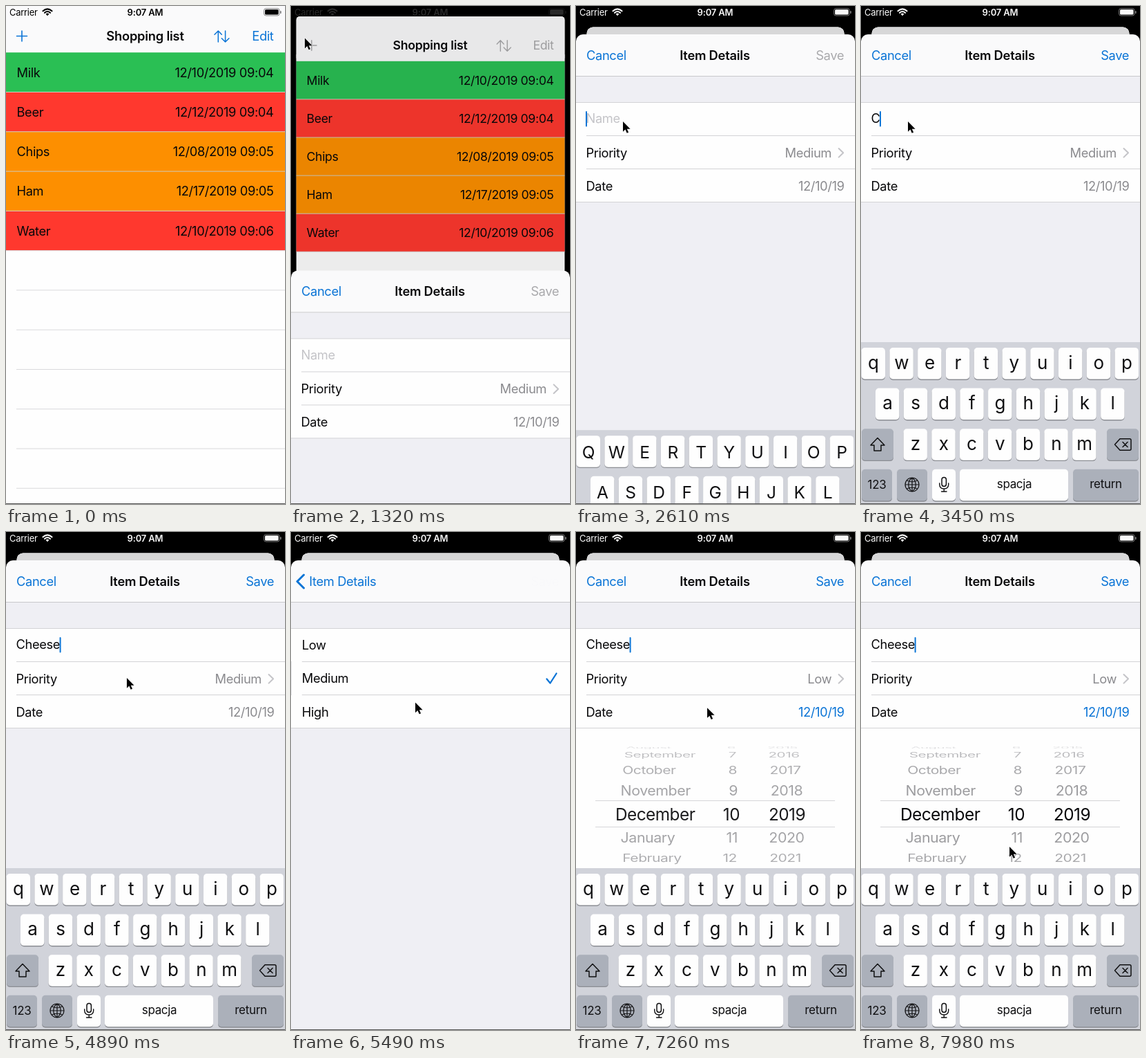
Write an HTML page that moves like this. It is 404 px wide and 720 px high and loops after 8000 ms.

```html
<!DOCTYPE html>
<html lang="en">
<head>
<meta charset="utf-8">
<title>Shopping list</title>
<style>
html, body { margin: 0; width: 100%; height: 100%; overflow: hidden; background: #000; }
svg { display: block; width: 100vw; height: 100vh; }
text { font-family: Inter, "Liberation Sans", sans-serif; letter-spacing: -.02em; white-space: pre; }
text[font-weight="600"] { letter-spacing: -.012em; }
</style>
</head>
<body>
<svg id="stage" viewBox="0 0 404 720"></svg>
<script>
const LOOP = 8000;
const SHEET = 1241.5, KEYS = 2537.5, PUSH = 5090, POP = 6225, PICK = 7060;
const TYPED = [3390, 3540, 3660, 3780, 3930, 4050];
const BLUE = '#0a74d6', INK = '#08080a', GREY = '#8a8a8e', FAINT = '#c4c4c8';
const PAPER = '#fefefe', BAR = '#fafafb', GROUP = '#efeff4', LINE = '#d3d3d6', PRESSED = '#d9d9dd';
const GREEN = '#2abf54', RED = '#ff382e', ORANGE = '#fd8f00';
const ITEMS = [
  ['Milk', '12/10/2019 09:04', GREEN], ['Beer', '12/12/2019 09:04', RED],
  ['Chips', '12/08/2019 09:05', ORANGE], ['Ham', '12/17/2019 09:05', ORANGE],
  ['Water', '12/10/2019 09:06', RED]
];
const MONTHS = ['August', 'September', 'October', 'November', 'December', 'January', 'February', 'March', 'April'];
// pointer stops: time, x, y
const PATH = [
  [450, 130, 725], [1150, 20, 46.5], [1700, 20, 46.5], [2400, 68, 167], [4250, 68, 167],
  [4900, 175, 211], [5150, 175, 211], [5490, 180, 246.5], [5600, 181, 246], [6060, 184, 158],
  [6260, 184, 158], [6600, 187, 245], [7000, 190, 254], [7250, 190, 254], [7950, 215, 455]
];

const stage = document.getElementById('stage');
const pen = document.createElement('canvas').getContext('2d');
const clamp = v => Math.max(0, Math.min(1, v));

// critically damped spring from 0 to 1
const spring = (t, start) => {
  const x = Math.max(0, t - start) * .021;
  return 1 - (1 + x) * Math.exp(-x);
};

const rect = (x, y, w, h, fill, r = 0, extra = '') =>
  `<rect x="${x}" y="${y}" width="${w}" height="${h}" rx="${r}" fill="${fill}" ${extra}/>`;
const text = (x, y, s, fill = INK, anchor = 'start', size = 18.3, weight = 400) =>
  `<text x="${x}" y="${y}" fill="${fill}" text-anchor="${anchor}" font-size="${size}" font-weight="${weight}">${s}</text>`;
const line = (d, stroke, w = 1.5, fill = 'none') =>
  `<path d="${d}" stroke="${stroke}" stroke-width="${w}" fill="${fill}" stroke-linecap="round" stroke-linejoin="round"/>`;
const group = (x, y, body) => `<g transform="translate(${x} ${y})">${body}</g>`;
const fade = (o, body) => `<g opacity="${o}">${body}</g>`;

function statusBar(p) {
  const g = Math.round(250 * clamp((p - .4) / .6)), c = `rgb(${g},${g},${g})`;
  return text(5, 13.5, 'Carrier', c, 'start', 13) +
    line('M53.5 7.2Q60 1.5 66.5 7.2M56 9.8Q60 6.2 64 9.8', c, 2.1) +
    `<path d="M57.6 11.6Q60 9.6 62.4 11.6L60 14.2Z" fill="${c}"/>` +
    text(201.5, 13.5, '9:07 AM', c, 'middle', 13, 600) +
    rect(373.5, 3.5, 22.5, 10.5, 'none', 3, `stroke="${c}" stroke-opacity=".45"`) +
    rect(375, 5, 19.5, 7.5, c, 1.6) + rect(397, 7, 1.6, 4, c, .8, 'opacity=".5"');
}

function list(p) {
  const tint = p > .1 ? '#a9a9ab' : BLUE, pitch = 57.28;
  let s = rect(0, 0, 404, 780, PAPER, 10 * p) + rect(0, 0, 404, 67, BAR, 10 * p) + rect(0, 57, 404, 10, BAR);
  ITEMS.forEach(([name, date, fill], i) => {
    const y = 67.2 + i * pitch;
    s += rect(0, y, 404, pitch, fill) + text(15.5, y + 35.3, name) + text(387.5, y + 35.3, date, INK, 'end');
  });
  for (let i = 1; i < 12; i++)
    s += rect(i < 6 ? 0 : 15, 66.7 + i * pitch, 404, 1, i < 5 ? '#cfcbbd' : '#d9d9dc');
  s += line('M15.5 43.5H30.5M23 36V51', tint, 1.6) +
    line('M307.3 52V36M302 41.3L307.3 36L312.3 41.3M317.6 36V52M312.3 46.7L317.6 52L322.9 46.7', tint) +
    text(201.5, 50, 'Shopping list', INK, 'middle', 18.3, 600) + text(387.5, 50, 'Edit', tint, 'end') +
    rect(0, 0, 404, 780, '#000', 10 * p, `opacity="${.14 * p}"`);
  return `<g transform="translate(${15.5 * p} ${30.5 * p}) scale(${1 - 31 * p / 404})">${s}</g>`;
}

function picker(open) {
  let s = '';
  for (let i = -4; i <= 4; i++) {
    const k = Math.abs(i), a = i * 20.5 * Math.PI / 180;
    const fill = [INK, '#9c9c9f', '#a8a8ab', '#bbbbbe', '#e0e0e2'][k];
    const size = k ? 21.7 - .35 * k : 24.3;
    const put = (x, v, anchor) => text(x, size * .36, v, fill, anchor, size);
    s += `<g transform="translate(0 ${408 + 97 * Math.sin(a)}) scale(1 ${Math.cos(a)})">` +
      put(k ? 62 + 2.6 * k : 57, MONTHS[i + 4], 'start') +
      put(k ? 235 - k : 237, 10 + i, 'end') +
      put(k ? 307 - 2 * k : 305.5, 2019 + i, 'middle') + '</g>';
  }
  s += rect(28, 388, 347, 1, LINE) + rect(28, 426, 347, 1, LINE);
  return `<clipPath id="drawer"><rect x="0" y="284" width="404" height="${233 * open}"/></clipPath>` +
    rect(0, 284, 404, 233 * open, PAPER) + `<g clip-path="url(#drawer)">${fade(open, s)}</g>`;
}

const section = h => rect(0, 139.5, 404, h, PAPER);
const rules = () => rect(0, 139, 404, 1, LINE) + rect(15, 187, 389, 1, LINE) +
  rect(15, 235, 389, 1, LINE) + rect(0, 283, 404, 1, LINE);

function details(t, q) {
  const name = 'Cheese'.slice(0, TYPED.filter(at => t >= at).length);
  const open = spring(t, PICK);
  const held = t < PUSH - 40 ? 0 : t < POP ? 1 : q;
  pen.font = '18.3px Inter, "Liberation Sans", sans-serif';
  const caret = 14 + pen.measureText(name).width - name.length * .366;
  let s = rect(0, 102, 404, 618, GROUP) + section(144) +
    rect(0, 188, 404, 47, PRESSED, 0, `opacity="${held}"`) +
    (open > 0 ? picker(open) : '') + rules() +
    text(14.5, 169.3, name || 'Name', name ? INK : FAINT);
  if (t >= KEYS) s += rect(caret, 152, 2, 22.5, BLUE, 1);
  return s + text(14.5, 218.5, 'Priority') +
    text(370, 218.5, t < POP ? 'Medium' : 'Low', GREY, 'end') +
    line('M380.5 206L387 212.3L380.5 218.6', FAINT, 2) +
    text(14.5, 266.5, 'Date') + text(388.5, 266.5, '12/10/19', open > 0 ? BLUE : GREY, 'end');
}

function choices(t) {
  return rect(0, 102, 404, 618, GROUP) + section(144) +
    (t >= POP ? rect(0, 140, 404, 47, PRESSED) : '') + rules() +
    ['Low', 'Medium', 'High'].map((s, i) => text(15, 170.2 + 48.2 * i, s)).join('') +
    line('M369.5 212.5L374.5 218.5L383.5 204.5', BLUE, 2.3);
}

function sheet(t, p, q) {
  const save = t >= TYPED[0] ? BLUE : '#a9a9ac';
  let s = rect(0, 41, 404, 100, BAR, 10) + group(-121 * q, 0, details(t, q));
  if (q > .0005) s += group(404 * (1 - q), 0, choices(t));
  s += rect(0, 101, 404, 1, '#c9c9cc') +
    fade(1 - q, text(15, 78, 'Cancel', BLUE) + text(388, 78, 'Save', save, 'end') +
      text(201 - 126 * q, 78, 'Item Details', INK, 'middle', 18.3, 600));
  if (q > 0) s += fade(q, line('M18.5 62L9 71.5L18.5 81', BLUE, 3) +
    text(26 + 126 * (1 - q), 78, 'Item Details', BLUE));
  return group(0, 679 * (1 - p), s);
}

function keyboard(t, up, q) {
  const moving = q > .002, caps = t < TYPED[0];
  const dark = moving ? '#98989e' : '#abb0ba', ink = '#101012';
  const key = (x, y, w, fill = PAPER) => rect(x, y + 1.4, w, 45.5, '#8c8e94', 5) + rect(x, y, w, 45.5, fill, 5);
  let s = rect(0, 486, 404, 234, moving ? GROUP : '#d1d3da');
  ['qwertyuiop', 'asdfghjkl', 'zxcvbnm'].forEach((row, r) => {
    const first = [17.8, 38.2, 78.7][r], y = 494 + 58.6 * r;
    [...row].forEach((c, i) => {
      const x = first + 40.77 * i;
      s += key(x - 17.2, y, 34.4) +
        text(x, y + (caps ? 32.5 : 30.5), caps ? c.toUpperCase() : c, ink, 'middle', caps ? 24.5 : 26);
    });
  });
  s += key(1, 611.2, 46, caps ? PAPER : dark) + key(356, 611.2, 46, dark) +
    key(1, 669.8, 44, dark) + key(52, 669.8, 44, dark) + key(103, 669.8, 34) +
    key(143, 669.8, 157) + key(307, 669.8, 95, dark) +
    line('M24 624.5L34 635H29V643H19V635H14Z', ink, 1.5, caps ? ink : 'none') +
    line('M367.5 634L375 625.7H389Q391 625.7 391 627.7V640.3Q391 642.3 389 642.3H375ZM379 630.5L386 637.5M386 630.5L379 637.5', ink) +
    line('M64 692a10 10 0 1 0 20 0a10 10 0 1 0 -20 0H84M74 682V702M74 682C67 687 67 697 74 702C81 697 81 687 74 682M66.5 686Q74 690 81.5 686M66.5 698Q74 694 81.5 698', ink, 1.2) +
    rect(117, 681.5, 6.4, 13, 'none', 3.2, `stroke="${ink}" stroke-width="1.5"`) +
    line('M113.7 690V692Q114 698 120.2 698Q126.4 698 126.7 692V690M120.2 698V702M116.5 702H124', ink, 1.4) +
    text(23, 698, '123', ink, 'middle', 17) + text(222, 697, 'spacja', ink, 'middle', 17) +
    text(354.5, 697, 'return', ink, 'middle', 17);
  return group(-404 * q, 234 * (1 - up), s);
}

function pointer(t) {
  let i = PATH.findIndex(k => k[0] > t);
  if (i === 0) return '';
  if (i < 0) i = PATH.length - 1;
  const [t0, x0, y0] = PATH[i - 1], [t1, x1, y1] = PATH[i];
  const u = clamp((t - t0) / (t1 - t0)), e = u * u * (3 - 2 * u);
  return group(x0 + (x1 - x0) * e, y0 + (y1 - y0) * e,
    `<path transform="scale(.92)" d="M0 0V16L3.7 12.6L6.2 18.2L8.8 17.1L6.3 11.6H11.5Z" stroke="${PAPER}" paint-order="stroke"/>`);
}

function draw() {
  const t = performance.now() % LOOP;
  const p = spring(t, SHEET), up = spring(t, KEYS);
  const q = t < POP ? spring(t, PUSH) : 1 - spring(t, POP);
  stage.innerHTML = rect(0, 0, 404, 720, '#000') + list(p) + statusBar(p) +
    (p > 0 ? sheet(t, p, q) : '') +
    (up > 0 && q < .999 ? keyboard(t, up, q) : '') +
    rect(0, 719, 404, 1, '#555') + pointer(t);
  requestAnimationFrame(draw);
}
draw();
</script>
</body>
</html>
```
